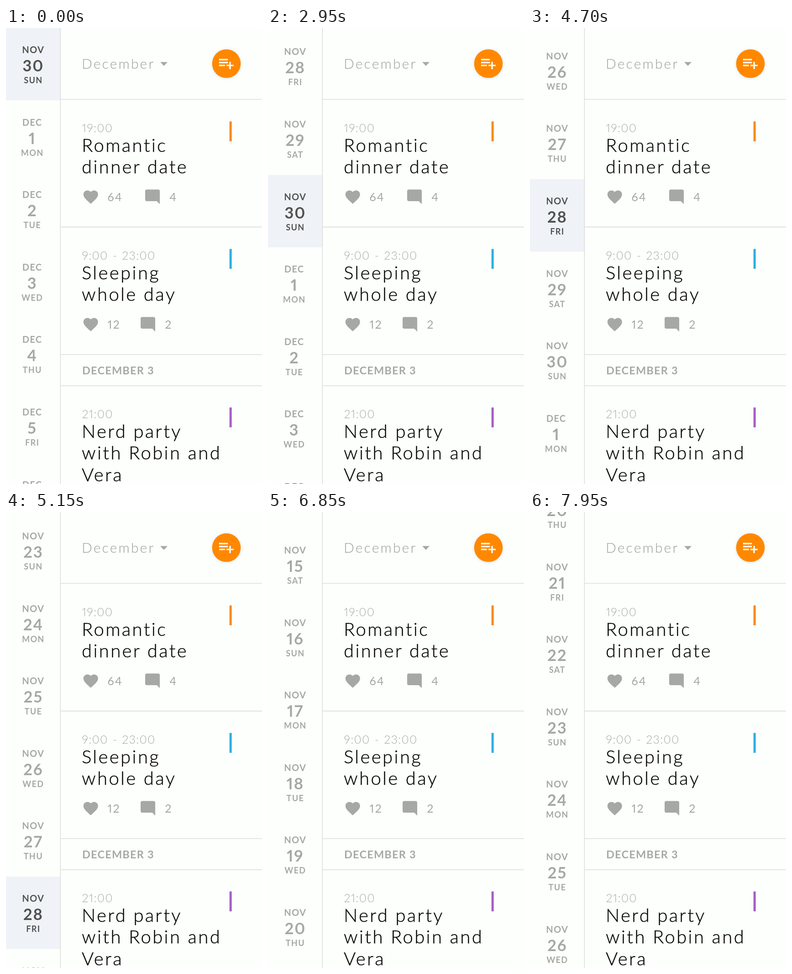
An HTML page that plays this animation: 561x998 px, repeating every 8000 ms.

```html
<!DOCTYPE html>
<html lang="en">
<head>
<meta charset="utf-8">
<title>Agenda</title>
<style>
  html, body { margin: 0; width: 100%; height: 100%; overflow: hidden; background: #fdfffc; }
  svg { display: block; width: 561px; height: 998px; font-family: Lato, sans-serif; fill: #a6a8a6; font-variant-numeric: proportional-nums; }
  .line { stroke: #dcdedc; stroke-width: 1.6; }
  .month { font-size: 30px; font-weight: 300; letter-spacing: 3.2px; stroke: #a6a8a6; stroke-width: .25px; }
  .time { font-size: 25px; font-weight: 300; letter-spacing: 1.3px; word-spacing: 2px; }
  .title { font-size: 40px; font-weight: 300; letter-spacing: 3.4px; fill: #0c0c0c; stroke: #0c0c0c; stroke-width: .5px; }
  .count { font-size: 25px; letter-spacing: 2px; }
  .section { font-size: 23.5px; font-weight: 700; letter-spacing: 1.2px; }
  .day { font-weight: 700; text-anchor: middle; letter-spacing: 1.4px; }
  .day rect { fill: none; }
  .day.selected { fill: #505250; }
  .day.selected rect { fill: #eff3f8; }
  .name { font-size: 20px; }
  .number { font-size: 34.5px; letter-spacing: 2px; }
  .week { font-size: 18px; }
  .button { fill: #ff8800; filter: drop-shadow(0 1.5px 3px #0002); }
</style>
</head>
<body>
<svg viewBox="0 0 561 998">
  <defs>
    <path id="heart" d="M12 21.35l-1.45-1.32C5.4 15.36 2 12.28 2 8.5 2 5.42 4.42 3 7.5 3c1.74 0 3.41.81 4.5 2.09C13.09 3.81 14.76 3 16.5 3 19.58 3 22 5.42 22 8.5c0 3.78-3.4 6.86-8.55 11.54z"/>
    <path id="comment" d="M22 4c0-1.1-.9-2-2-2H4c-1.1 0-2 .9-2 2v12c0 1.1.9 2 2 2h14l4 4z"/>
  </defs>
  <g id="days"></g>
  <path class="line" d="M119.3 0V998M119 156.3H561M119 435.6H561M119 714.8H561M119 783H561"/>
  <text class="month" x="166" y="89">December</text>
  <path d="M338 74.5h16l-8 8.5z"/>
  <circle class="button" cx="483" cy="78" r="31.3"/>
  <path fill="#fff" transform="translate(463.8 58) scale(1.6)" d="M2 6h12v2H2zM2 10h12v2H2zM2 14h8v2H2zM16 10h2v4h4v2h-4v4h-2v-4h-4v-2h4z"/>
  <text class="section" x="167" y="758">DECEMBER 3</text>
  <g id="events"></g>
</svg>
<script>
const ROW = 158.6, LOOP = 8000;
const WEEK = ['SUN', 'MON', 'TUE', 'WED', 'THU', 'FRI', 'SAT'];
const text = (cls, x, y, s) => `<text class="${cls}" x="${x}" y="${y}">${s}</text>`;
const icon = (id, x, y) => `<use href="#${id}" transform="translate(${x} ${y}) scale(1.6)"/>`;

// Agenda entries; y is the top rule of each entry
const events = [
  { y: 156, color: '#f98a12', time: '19:00', lines: ['Romantic', 'dinner date'], likes: 64, comments: 4, chatX: 301.8 },
  { y: 435, color: '#2cb0e2', time: '9:00 - 23:00', lines: ['Sleeping', 'whole day'], likes: 12, comments: 2, chatX: 291.8 },
  { y: 782, color: '#a55fc4', time: '21:00', lines: ['Nerd party', 'with Robin and', 'Vera'] }
];
document.getElementById('events').innerHTML = events.map(e =>
  `<rect x="489.7" y="${e.y + 48.5}" width="5" height="43.5" fill="${e.color}"/>` +
  text('time', 166.5, e.y + 72, e.time) +
  e.lines.map((s, i) => text('title', 166, e.y + 115 + i * 47.4, s)).join('') +
  (e.likes ? icon('heart', 166.5, e.y + 194.6) + text('count', 222.5, e.y + 223, e.likes) +
    icon('comment', e.chatX, e.y + 194.2) + text('count', e.chatX + 56.5, e.y + 223, e.comments) : '')
).join('');

// Day rows, placed relative to 30 November
const days = document.getElementById('days');
for (let i = -17; i <= 7; i++) {
  const december = i > 0, x = december ? 57.6 : 59.8;
  days.innerHTML += `<g class="day" data-offset="${i}" transform="translate(0 ${i * ROW})">` +
    `<rect width="119" height="158.4"/>` +
    text('name', x, 55, december ? 'DEC' : 'NOV') +
    text('number', x, 95, december ? i : 30 + i) +
    text('week', x, 121, WEEK[(i + 21) % 7]) + '</g>';
}
const rows = [...days.children];

// Scroll keys: time in ms, offset in px, speed in px/ms
const keys = [
  [0, 0, 0], [2550, 0, 0], [2900, 230, 1.95], [3500, 640, 0],
  [4650, 640, 0], [5150, 1114, 1.2], [5700, 2022, 1.57], [6450, 2415, 0],
  [6950, 2415, 0], [7250, 1930, -2.8], [7500, 1561, -.33], [8050, 1499.6, 0]
];

function scrollAt(t) {
  const n = keys.findIndex(k => k[0] > t);
  const [t0, a, va] = keys[n - 1], [t1, b, vb] = keys[n];
  const d = t1 - t0, u = (t - t0) / d, w = 1 - u;
  return a * w * w * (1 + 2 * u) + b * u * u * (3 - 2 * u) + d * u * w * (va * w - vb * u);
}

function draw(now) {
  const t = now % LOOP, selected = t < 3800 ? 0 : -2;
  days.setAttribute('transform', `translate(0 ${scrollAt(t).toFixed(2)})`);
  for (const row of rows) row.classList.toggle('selected', +row.dataset.offset === selected);
}

const start = performance.now();
function tick() {
  draw(performance.now() - start);
  requestAnimationFrame(tick);
}
tick();
</script>
</body>
</html>
```
